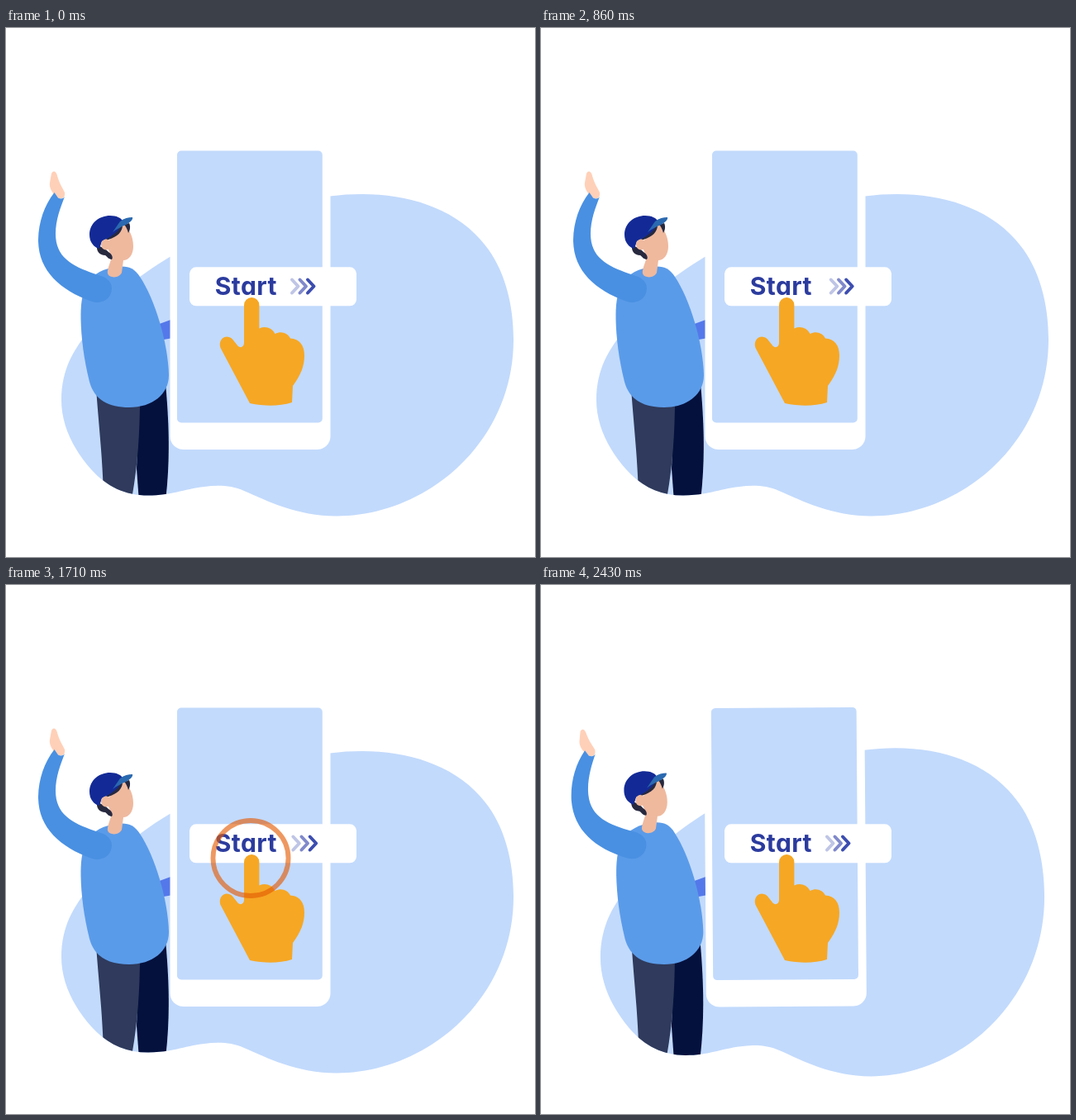
Write an HTML page that moves like this. It is 640 px wide and 640 px high and loops after 2500 ms.

```html
<!DOCTYPE html>
<html lang="en">
<head>
<meta charset="utf-8">
<title>Start</title>
<style>
  html, body { margin: 0; width: 100%; height: 100%; overflow: hidden; background: #fff; }
  svg { display: block; width: 100vw; height: 100vh; }
  text { font: 700 30px Inter, "Open Sans", sans-serif; font-feature-settings: "cv11"; letter-spacing: .4px; }
</style>
</head>
<body>
<svg viewBox="0 0 640 640">
  <defs>
    <clipPath id="ground"><use href="#blob"/></clipPath>
  </defs>

  <path id="blob" fill="#c2dafc" d="M392 203.500C468 194 540 212 579 262C603 291 614 334 614 377
    C614 440 587 498 537 540C494 575 445 590.500 400 590.500C352 590.500 316 572 288 560
    C272 553 256 553 240 555C214 558 200 565.500 172 565.500C144 565.500 122 555 103 534
    C80 508 67 479 67 450C67 411 84 388 95 373C120 330 160 300 198 277Z"/>

  <g clip-path="url(#ground)">
    <g id="legs">
      <path fill="#05113d" d="M162 440L158 533L161.500 580L192 580C198 535 198.500 490 193 430Z"/>
      <path fill="#2f3a5c" d="M109 436C113 490 117 520 118.500 580L150 580L151 575C159 535 162 490 162 450Z"/>
    </g>
  </g>
  <path fill="#5478ea" d="M180 360L202 352V375L185 378Z"/>

  <g id="phone">
    <rect x="198.500" y="139" width="194" height="371" rx="16" fill="#fff"/>
    <rect x="207" y="148.500" width="175.800" height="329" rx="5" fill="#c2dafc"/>
  </g>

  <g id="body">
    <path fill="#5a9be9" d="M130 289.500C146 287 154 289 162 301C180 328 196 380 197 420
      C197 443 177 459 149 459C124 459 107 450 101 428C94 400 91 375 90.500 352
      C90 322 95 296 130 289.500Z"/>
    <g id="head">
      <path fill="#efb99e" d="M130 250L143 238C150 244 154 254 154 264C154 275 148 281 142 281
        L140 296C137 303 125 303 123 297C122 293 126 284 128 277L121 262Z"/>
      <path fill="#27293f" d="M110 262C116 266 121 267 124 271C128 273 130 278 128 280
        C124 280 122 276 120 275C113 275 109 270 110 262Z"/>
      <path fill="#27293f" d="M143 238L149 236C151 240 150 245 148 248C147 244 145 240 143 238Z"/>
      <path fill="#27293f" d="M120 257L130 244L141 238C141 247 135 252 124 256Z"/>
      <path fill="#132a96" d="M101 250C101 236 113 227 126 227C134 227 139 230 141 233
        C140 242 133 249 122 255L116 258C114 263 114 266 112 267C105 264 101 258 101 250Z"/>
      <path fill="#2a69b0" d="M129 247L138 234C143 230 148 229 153 229C154 232 149 236 145 238
        C139 241 134 243 129 247Z"/>
      <ellipse cx="121" cy="262" rx="6" ry="6.500" fill="#efb99e"/>
    </g>
    <g id="arm">
      <path id="palm" fill="#ffd0b8" d="M55 176C57 172 60 173 61.500 177C65 190 69 194 71 199
        C72 205 68 208 63 205.500C55 200 52 192 53 187Z"/>
      <path fill="#4990e2" d="M58.500 199C46 215 39 236 39 258C40 294 65 317 104 331
        C118 335 128 326 128 315C128 306 120 301 112 299C82 289 60 279 60 249
        C60 232 66 217 71 204C69 207 66 207 63 205.500Z"/>
    </g>
  </g>

  <rect x="222" y="289.300" width="202" height="47" rx="8" fill="#fff"/>
  <text x="252.800" y="322.600" fill="#2b3b9e">Start</text>
  <g id="arrows" fill="none" stroke-width="4" stroke-linecap="round" stroke-linejoin="round">
    <path stroke="#bfc5e6" d="M346 304.500L353.500 312.500L346 320.500"/>
    <path stroke="#8089cb" d="M355.500 304.500L363 312.500L355.500 320.500"/>
    <path stroke="#3c4db0" d="M365 304.500L372.500 312.500L365 320.500"/>
  </g>

  <path fill="#f6a724" d="M288 335.200a9.200 9.200 0 0 1 18.400 0V363.500C314 360 322 363 325.500 370
    C333 366 341 369 344 375.500C355 376 361 384 361 396C361 409 357 419 347 433L346 453
    C330 458 312 457.500 295 454L259.500 387C256 377 266 369 274 376.500L280 384C283 388 288 386 288 381Z"/>
  <circle id="ring" cx="296" cy="330.500" fill="none" stroke="#e55c06"/>
</svg>

<script>
const LOOP = 2500, FPS = 14;
const $ = id => document.getElementById(id);
const arrows = [...$("arrows").children];
const clamp = v => Math.min(1, Math.max(0, v));
const span = (t, from, to) => clamp((t - from) / (to - from));
const wave = u => (1 - Math.cos(Math.PI * u)) / 2;
const move = (el, value) => el.setAttribute("transform", value);

function stretch(id, x, y, dx, dy) {
  move($(id), `translate(${x} ${y}) scale(${1 + dx} ${1 + dy}) translate(${-x} ${-y})`);
}

function drawArrows(t) {
  arrows.forEach((el, i) => {
    const u = span(t, 130 + 65 * i, 2030 + 65 * i);
    move(el, `translate(${(5.5 + 0.25 * i) * wave(2 * u)} 0)`);
  });
}

function drawRing(t) {
  const u = span(t, 1145, 1960), ring = $("ring");
  ring.setAttribute("r", 57.5 * wave(u));
  ring.setAttribute("stroke-width", 1.5 + 14.5 * (1 - u));
  ring.setAttribute("opacity", u > 0 ? clamp(2.1 * (1 - u)) : 0);
}

function drawSway(t) {
  const q = wave(span(t, 1790, 2855)) / 0.652;
  const swing = Math.pow(span(t, 1790, 2429), 1.35);
  stretch("blob", 340.5, 395, -0.018 * q, 0.02 * q);
  stretch("legs", 152, 459, -0.013 * q, 0.007 * q);
  stretch("body", 144, 459, -0.012 * q, 0.007 * q);
  move($("phone"), `rotate(${-0.42 * q} 295 313)`);
  move($("head"), `translate(${-1.1 * q} 0)`);
  move($("arm"), `translate(${-0.7 * q} 0) rotate(${-2.9 * swing} 114 316)`);
  move($("palm"), `rotate(${-2 * swing} 65 203)`);
}

function frame(now) {
  const tick = Math.floor(((now % LOOP) + 5) * FPS / 1000) % (LOOP * FPS / 1000);
  const t = tick * 1000 / FPS;
  drawArrows(t);
  drawRing(t);
  drawSway(t);
}

const begin = performance.now();
function loop() {
  frame(performance.now() - begin);
  requestAnimationFrame(loop);
}
loop();
</script>
</body>
</html>
```
